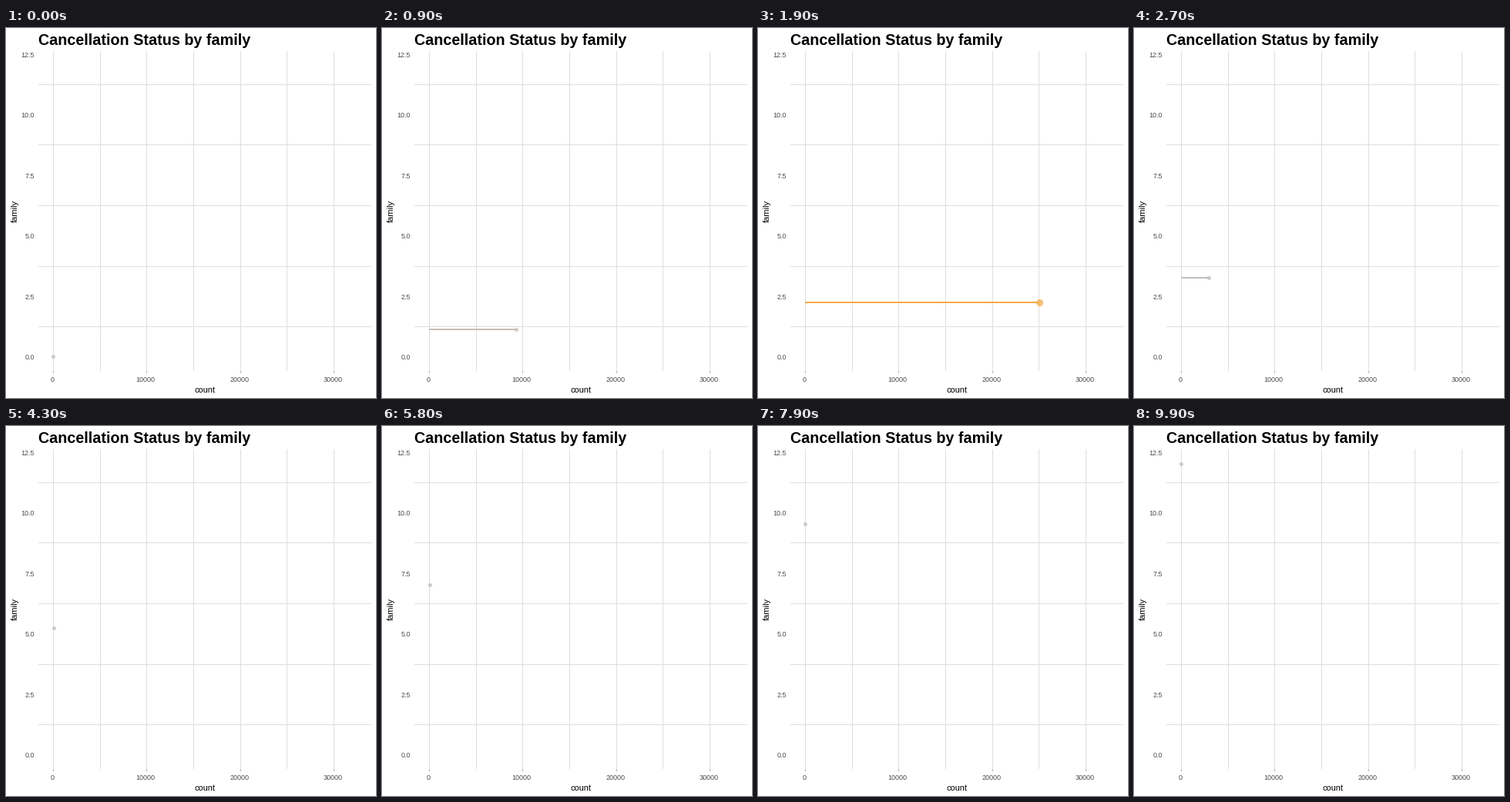
A matplotlib script for the animation above (10 s loop, 480x480 px).

```python
import numpy as np
import matplotlib
import matplotlib.pyplot as plt
from matplotlib.animation import FuncAnimation
from matplotlib.patches import Circle

matplotlib.rcParams["toolbar"] = "None"
plt.rcParams["font.family"] = "Liberation Sans"

SIZE, DPI = 480, 72
FRAMES, INTERVAL = 100, 100
LEFT, RIGHT, TOP, BOTTOM = 42, 474, 30, 445
GRID, TICK, TICK_TEXT = "#dedede", "#b3b3b3", "#4d4d4d"

# One entry per family size; the largest group is highlighted.
FAMILY = np.array([0, 1, 2, 3, 4, 5, 10, 12])
COUNT = np.array([25, 6400, 32310, 3407, 1648, 75, 1, 2])
HIGHLIGHT = (FAMILY == 2).astype(float)
KEYS = np.floor(FAMILY / FAMILY[-1] * (FRAMES - 1) + 0.5)

GREY, ORANGE = np.array([190, 190, 190]) / 255, np.array([255, 165, 0]) / 255
TO_XYZ = np.array([[0.4124, 0.3576, 0.1805],
                   [0.2126, 0.7152, 0.0722],
                   [0.0193, 0.1192, 0.9505]])
WHITE = TO_XYZ.sum(axis=1)


def to_lab(rgb):
    """Cube-root XYZ, which mixes linearly in the same way as Lab."""
    linear = np.where(rgb > 0.04045, ((rgb + 0.055) / 1.055) ** 2.4, rgb / 12.92)
    return np.cbrt(TO_XYZ @ linear / WHITE)


def mix(t):
    lab = to_lab(GREY) * (1 - t) + to_lab(ORANGE) * t
    linear = np.clip(np.linalg.solve(TO_XYZ, lab ** 3 * WHITE), 0, 1)
    rgb = np.where(linear > 0.0031308,
                   1.055 * linear ** (1 / 2.4) - 0.055, 12.92 * linear)
    return tuple(np.clip(rgb, 0, 1))


# Everything sits on whole pixels.
def px(count):
    return round(61 + count * 0.012133)


def py(family):
    return round(426.4 - family * 31.42)


fig = plt.figure(figsize=(SIZE / DPI, SIZE / DPI), dpi=DPI, facecolor="white")
ax = fig.add_axes([0, 0, 1, 1])
ax.set_xlim(0, SIZE)
ax.set_ylim(SIZE, 0)
ax.axis("off")


def label(x, y, text, size, **kw):
    kw = {"ha": "center", "va": "baseline", "color": "black", **kw}
    ax.text(x, y, text, fontsize=size, **kw)


def line(xs, ys, color, lw=1, zorder=1):
    return ax.plot(xs, ys, color=color, lw=lw, solid_capstyle="butt",
                   snap=False, zorder=zorder)[0]


for count in range(0, 30001, 5000):
    x = px(count)
    line([x + 0.5] * 2, [TOP, BOTTOM], GRID)
    if count % 10000 == 0:
        line([x + 0.5] * 2, [BOTTOM, BOTTOM + 3], TICK)
        label(x - 1, 459, str(count), 9, color=TICK_TEXT)

for step in range(6):
    value = 2.5 * step
    label(37, py(value) + 4, f"{value:.1f}", 9, ha="right", color=TICK_TEXT)
    if step < 5:
        line([LEFT, RIGHT], [py(value + 1.25) + 0.5] * 2, GRID)

label(LEFT, 22, "Cancellation Status by family", 19.7, ha="left", weight="bold")
label(258, 473, "count", 11)
label(15, 238, "family", 11, rotation=90, rotation_mode="anchor")

bar = line([], [], GREY, lw=2, zorder=2)
fill = ax.add_patch(Circle((0, 0), 1, lw=0, alpha=0.7, zorder=3))
ring = ax.add_patch(Circle((0, 0), 1, fill=False, lw=1, alpha=0.7, zorder=4))


def update(frame):
    family, count, glow = (np.interp(frame, KEYS, v)
                           for v in (FAMILY, COUNT, HIGHLIGHT))
    x, y, color = px(count), py(family), mix(glow)
    size = 1.5 + 2.5 * glow
    bar.set_data([px(0), x], [y, y])
    bar.set_color(color)
    for dot in (fill, ring):
        dot.center = x + 0.5, y + 0.5
        dot.radius = round((size * 2.845 + 0.94) * 0.375)
    fill.set_facecolor(color)
    ring.set_edgecolor(color)
    return bar, fill, ring


anim = FuncAnimation(fig, update, frames=FRAMES, interval=INTERVAL,
                     repeat=True, repeat_delay=0, blit=False)
plt.show()
```
